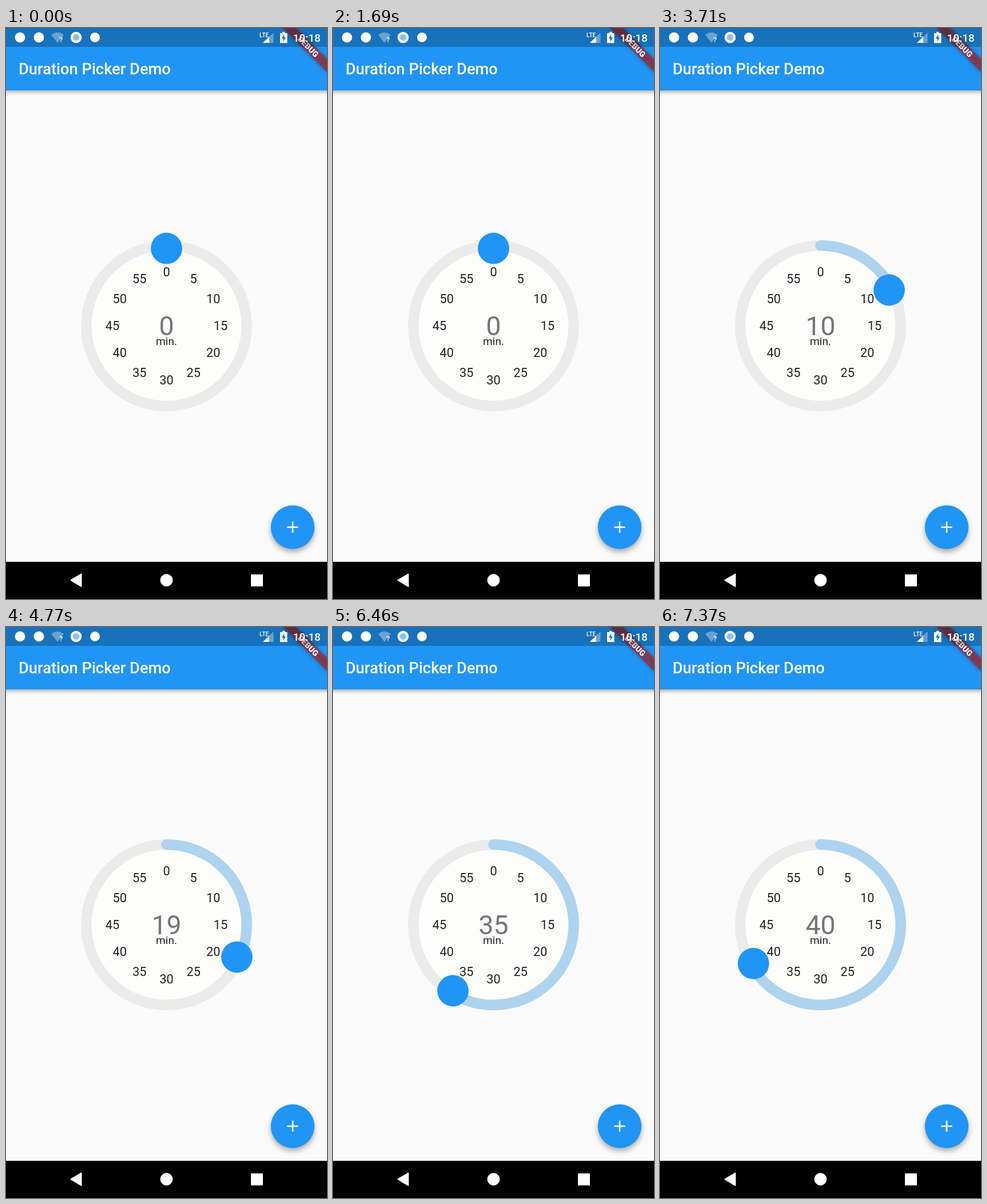
An HTML page that plays this animation: 561x998 px, repeating every 8 s.

```html
<!DOCTYPE html>
<html lang="en">
<head>
<meta charset="utf-8">
<title>Duration Picker Demo</title>
<style>
  html, body { margin: 0; width: 100%; height: 100%; overflow: hidden; background: #fafafa; }
  svg { display: block; width: 100vw; height: 100vh; font-family: Roboto, sans-serif; }
  .blue { fill: #2095f5; }
  .white { fill: #fff; }
  .medium { font-weight: 500; }
  .mid { text-anchor: middle; }
  .bar { filter: drop-shadow(0 3px 3px rgba(0, 0, 0, .32)); }
  .fab { filter: drop-shadow(0 5px 5px rgba(0, 0, 0, .32)); }
  .banner { filter: drop-shadow(0 0 4px rgba(0, 0, 0, .45)); }
</style>
</head>
<body>
<svg viewBox="0 0 561 998" preserveAspectRatio="none">
  <rect width="561" height="998" fill="#fafafa"/>

  <!-- app bar -->
  <rect class="blue bar" x="-10" y="-10" width="581" height="119"/>
  <text class="white medium" x="22" y="81" font-size="27.27">Duration Picker Demo</text>

  <!-- dial -->
  <g transform="translate(280.5 520.5)">
    <circle r="140.2" fill="#fdfdfc" stroke="#ebebeb" stroke-width="18.4"/>
    <circle id="arc" r="140.2" fill="none" stroke="#add3ef" stroke-width="18.4"
      stroke-linecap="round" pathLength="360" transform="rotate(-90)"/>
    <g id="labels" class="mid" font-size="21.8" fill="#222"></g>
    <text id="count" class="mid" y="16" font-size="46.4" fill="#757575"></text>
    <text class="mid" y="33.3" font-size="19.1" fill="#222">min.</text>
    <circle id="knob" class="blue" cy="-135.3" r="27.4"/>
  </g>

  <!-- add button -->
  <circle class="blue fab" cx="501" cy="872.5" r="38.2"/>
  <path d="M491.3 872.5h19.4M501 862.8v19.4" stroke="#fff" stroke-width="2.7"/>

  <!-- debug banner -->
  <g transform="translate(561 0) rotate(45)">
    <rect class="banner" x="-54.5" y="38.1" width="109" height="16.4" fill="#b71c1c" fill-opacity=".63"/>
    <text class="white mid" y="51.2" font-size="13.9" font-weight="900">DEBUG</text>
  </g>

  <!-- status bar -->
  <rect width="561" height="33" fill="#000" fill-opacity=".24"/>
  <g class="white">
    <circle cx="24.5" cy="16.5" r="9"/>
    <circle cx="57.5" cy="16.5" r="9"/>
    <path d="M79 12Q90 3.500 101 12L90 26Z" fill-opacity=".35"/>
    <text class="medium" x="93" y="25" font-size="13">?</text>
    <circle cx="122.500" cy="16.500" r="7.800" fill="#8fc0e8" stroke="#fff" stroke-width="4"/>
    <circle cx="155.500" cy="16.500" r="8.500"/>
    <text class="medium" x="443" y="15.500" font-size="10">LTE</text>
    <path d="M467.500 8V26H449Z" fill-opacity=".35"/>
    <path d="M460 15.300V26H449Z"/>
    <path d="M479 9h4V6.800h4.500V9h4V26.300H479Z"/>
    <path d="M486.300 11L481.800 18.500H484.600V24L489 16.500H486.300Z" fill="#1c72ba"/>
    <text class="medium" x="501.500" y="23.500" font-size="19.100">10:18</text>
  </g>

  <!-- navigation bar -->
  <rect y="933" width="561" height="65"/>
  <g class="white" stroke="#fff" stroke-linejoin="round">
    <path d="M113.500 965.200L131.500 954.500V976Z" stroke-width="2"/>
    <circle cx="280.500" cy="965.200" r="10.500"/>
    <rect x="429" y="956" width="19" height="19" stroke-width="2"/>
  </g>
</svg>
<script>
const LOOP = 8000;
const $ = id => document.getElementById(id);

const linear = u => u;
const settle = u => u * u * (3 - 2 * u);
const slow = power => u => 1 - (1 - u) ** power;

// start ms, end ms, start angle, end angle, ms per step, easing
const moves = [
  [0, 1, 0, 0, 1, linear],
  [2760, 2960, 31.4, 30, 40, settle],
  [3710, 3910, 62.5, 60, 40, settle],
  [4530, 4770, 63, 114.6, 48, linear],
  [4770, 5310, 114.6, 148.4, 45, slow(3)],
  [5310, 5510, 148.4, 150, 40, settle],
  [6090, 6460, 151, 211.6, 46.25, linear],
  [6460, 6880, 211.6, 244.2, 42, slow(2)],
  [6880, 7170, 244.2, 246.2, 48.3, linear],
  [7170, 7370, 246.2, 240, 40, settle]
];

function angleAt(time) {
  const [start, end, from, to, step, ease] = moves.findLast(move => move[0] <= time);
  const elapsed = Math.floor((time - start) / step + .01) * step;
  return from + (to - from) * ease(Math.min(1, elapsed / (end - start)));
}

for (let minute = 0; minute < 60; minute += 5) {
  const angle = minute * Math.PI / 30;
  const label = document.createElementNS("http://www.w3.org/2000/svg", "text");
  label.setAttribute("x", 94.5 * Math.sin(angle));
  label.setAttribute("y", 7.7 - 94.5 * Math.cos(angle));
  label.textContent = minute;
  $("labels").append(label);
}

function draw(now) {
  const angle = angleAt(Math.max(0, now - begin) % LOOP);
  $("arc").setAttribute("stroke-dasharray", `${angle} 720`);
  $("knob").setAttribute("transform", `rotate(${angle})`);
  $("count").textContent = Math.round(angle / 6);
  requestAnimationFrame(draw);
}

const begin = performance.now();
draw(begin);
</script>
</body>
</html>
```
